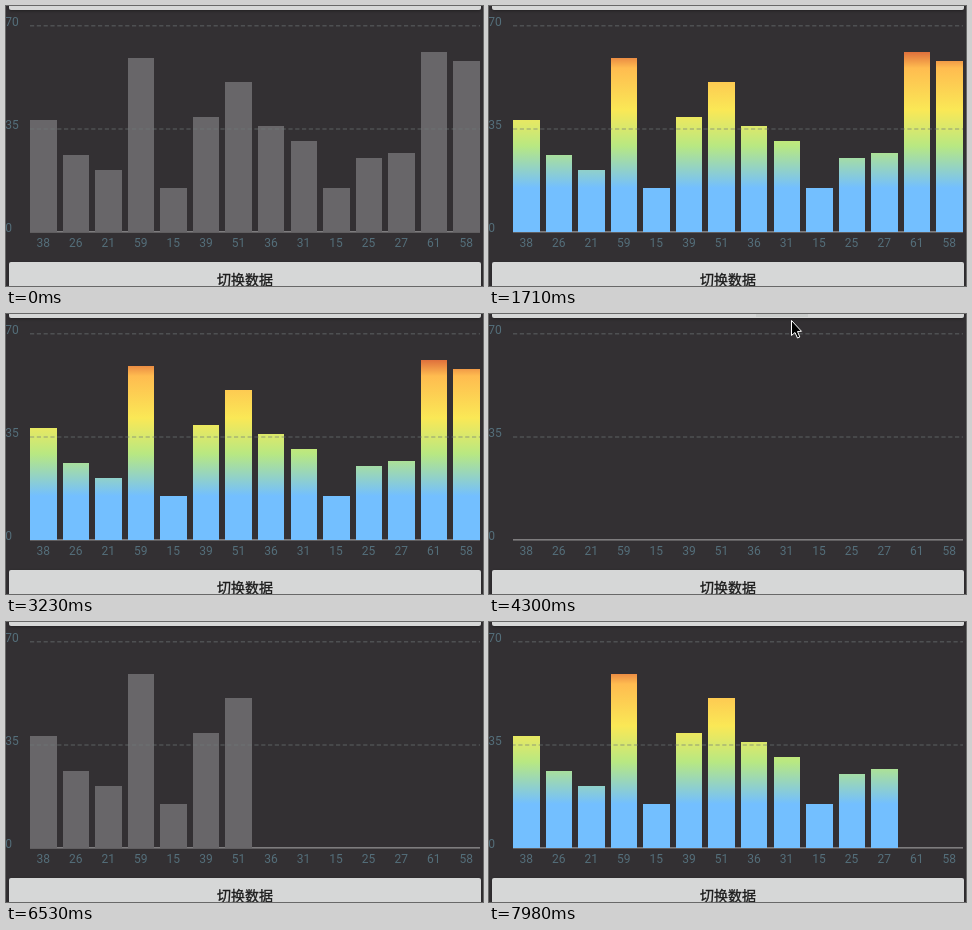
Recreate the animation shown at these times as an HTML page with a canvas. Size 477 by 280 pixels, loop 8 s.

```html
<!DOCTYPE html>
<html lang="zh">
<head>
<meta charset="utf-8">
<title>柱状图</title>
<style>
  html, body { margin: 0; width: 100%; height: 100%; overflow: hidden; background: #333033; }
  canvas { display: block; }
</style>
</head>
<body>
<canvas id="stage" width="477" height="280"></canvas>
<script>
const ctx = document.getElementById('stage').getContext('2d');
const LOOP = 8000;
const LEFT = 24, RIGHT = 474, BASE = 226, PEAK = 46, UNIT = 206 / 70;
const PITCH = 32.54, BAR_W = 26.5;
const values = [38, 26, 21, 59, 15, 39, 51, 36, 31, 15, 25, 27, 61, 58];

// Times in ms: bars vanish at CLEAR, then return one per STEP from GROW on
const CLEAR = 4300, GROW = 4685, STEP = 285;
const colorToggles = [500, 1060, 1710, 2700, 3230, 6530, 7310];

const heat = ctx.createLinearGradient(0, BASE, 0, PEAK);
[[182, '#73bfff'], [140, '#b8e882'], [104, '#fae856'],
 [62, '#ffbc50'], [PEAK, '#df703c']]
  .forEach(([y, color]) => heat.addColorStop((BASE - y) / (BASE - PEAK), color));

function rect(x, y, w, h, color) {
  ctx.fillStyle = color;
  ctx.fillRect(x, y, w, h);
}

function label(str, x, y, align) {
  ctx.font = '12px Roboto, sans-serif';
  ctx.textAlign = align;
  ctx.fillStyle = '#546e7a';
  ctx.fillText(str, x, y);
}

function button(y, h) {
  ctx.save();
  ctx.shadowColor = 'rgba(0,0,0,.35)';
  ctx.shadowBlur = 3;
  ctx.shadowOffsetY = 1;
  ctx.fillStyle = '#d6d7d7';
  ctx.beginPath();
  ctx.roundRect(3, y, 472, h, 2);
  ctx.fill();
  ctx.restore();
}

function caption(str, x, y) {
  ctx.font = '500 14px "Noto Sans CJK SC", "Noto Sans CJK", sans-serif';
  ctx.textAlign = 'center';
  ctx.fillStyle = ctx.strokeStyle = '#1c1c1c';
  ctx.lineWidth = 0.35;
  ctx.fillText(str, x, y);
  ctx.strokeText(str, x, y);
}

function bars(t) {
  const count = t < CLEAR ? values.length : Math.floor((t - GROW) / STEP) + 1;
  const colored = colorToggles.filter(at => at <= t).length % 2;
  values.slice(0, Math.max(0, count)).forEach((v, i) => {
    const x = 24.2 + i * PITCH;
    const left = Math.round(x), right = Math.round(x + BAR_W);
    const top = Math.round(BASE - v * UNIT);
    rect(left, top, right - left, BASE - top, colored ? heat : '#686669');
  });
}

function gridLines(t) {
  const beat = Math.floor(Math.max(0, t - GROW) / (STEP / 2));
  ctx.strokeStyle = 'rgba(112,120,120,.45)';
  ctx.lineWidth = 1.5;
  ctx.setLineDash([4.2, 2.6]);
  ctx.lineDashOffset = beat % 2 * 1.5;
  for (const y of [19.75, 123]) {
    ctx.beginPath();
    ctx.moveTo(LEFT, y);
    ctx.lineTo(RIGHT, y);
    ctx.stroke();
  }
  ctx.setLineDash([]);
}

function arrow(x, y) {
  ctx.save();
  ctx.translate(x + 0.5, y + 0.5);
  ctx.beginPath();
  [[0, 0], [0, 15], [3.5, 12], [6, 17.5], [8.3, 16.5], [6, 11], [10, 10.8]]
    .forEach(([px, py]) => ctx.lineTo(px, py));
  ctx.closePath();
  ctx.fillStyle = '#000';
  ctx.strokeStyle = '#fff';
  ctx.lineWidth = 1;
  ctx.fill();
  ctx.stroke();
  ctx.restore();
}

// Three jumps from a to b, slowing down for power > 1
function glide(t, from, a, b, power) {
  const u = Math.min(3, Math.floor((t - from) / 133)) / 3;
  const k = 1 - (1 - u) ** power;
  arrow(a[0] + (b[0] - a[0]) * k, a[1] + (b[1] - a[1]) * k);
}

function pointer(t) {
  const rest = [302, 6];
  if (t >= 3490 && t < 4435) glide(t, 3490, [200, 141], rest, 1.5);
  else if (t >= 4435 && t < 4980) glide(t, 4435, rest, [65, 262], 1);
}

function draw(t) {
  rect(0, 0, 477, 280, '#333033');
  button(-30, 34);
  if (t >= CLEAR && t < 4570) rect(267, 0, 52, 3, '#cbcdcc');
  button(256, 40);
  caption('切换数据', 239, 279);

  rect(LEFT, 225, RIGHT - LEFT, 1.6, '#7e7c7e');
  bars(t);
  gridLines(t);

  [70, 35, 0].forEach((v, i) => label(v, -0.7, 20 + i * 103, 'left'));
  values.forEach((v, i) => label(v, 37.2 + i * PITCH, 241, 'center'));
  pointer(t);
}

const start = performance.now();
function tick() {
  draw((performance.now() - start) % LOOP);
  requestAnimationFrame(tick);
}
tick();
</script>
</body>
</html>
```
